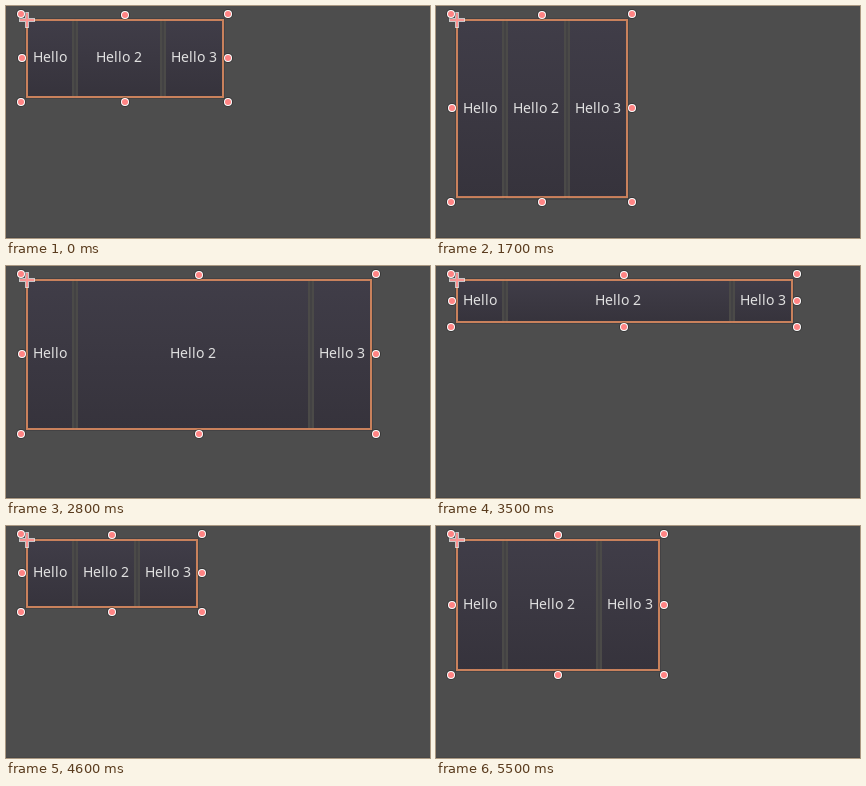
Recreate the animation shown at these times as an HTML page with a canvas. Size 424 px wide and 232 px high, loop 6100 ms.

```html
<!DOCTYPE html>
<html lang="en">
<head>
<meta charset="utf-8">
<title>Resizing a button row</title>
<style>
  html, body { margin: 0; height: 100%; overflow: hidden; background: #4d4d4d; }
  canvas { display: block; }
</style>
</head>
<body>
<canvas width="424" height="232"></canvas>
<script>
const ctx = document.querySelector('canvas').getContext('2d');
const LOOP = 6100, STEP = 100, LEFT = 21, TOP = 14, GAP = 4, PAD = 6, MIN_HEIGHT = 20;
ctx.font = '14px "Noto Sans", "Open Sans", sans-serif';

// The pointer circles once around the stage: time in ms, x, y
const path = [
  [900, 217, 91], [1600, 187, 179], [1700, 186, 191.6], [2300, 337, 201],
  [2800, 365, 163], [3000, 372, 120], [3500, 356, 56], [4100, 253, 32],
  [4400, 188, 52], [5000, 180, 138], [5500, 223, 144],
];

// Monotone cubic through the path on one axis
function pointer(axis, time) {
  const last = path.length - 1;
  const t = Math.max(path[0][0], time);
  if (t >= path[last][0]) return path[last][axis];
  const slope = i => (path[i + 1][axis] - path[i][axis]) / (path[i + 1][0] - path[i][0]);
  const tangent = i => {
    const a = slope(Math.max(i - 1, 0)), b = slope(Math.min(i, last - 1));
    return a * b > 0 ? 2 * a * b / (a + b) : 0;
  };
  const i = path.findIndex(point => point[0] > t) - 1;
  const h = path[i + 1][0] - path[i][0], u = (t - path[i][0]) / h, w = 1 - u;
  return path[i][axis] * (1 + 2 * u) * w * w + path[i + 1][axis] * u * u * (3 - 2 * u)
    + h * u * w * (tangent(i) * w - tangent(i + 1) * u);
}

// Glyphs advance by whole pixels
const advance = char => Math.round(ctx.measureText(char).width);
const textWidth = text => [...text].reduce((sum, char) => sum + advance(char), 0);
const minWidth = text => textWidth(text) + 2 * PAD;

function drawText(text, x, y) {
  ctx.fillStyle = '#e0e0e0';
  for (const char of text) {
    ctx.fillText(char, x, y);
    x += advance(char);
  }
}

function button(label, x, width, bottom) {
  const box = (color, grow) => {
    ctx.fillStyle = color;
    ctx.fillRect(x - grow, TOP - grow, width + 2 * grow, bottom - TOP + 2 * grow);
  };
  const shade = ctx.createLinearGradient(0, TOP, 0, bottom);
  shade.addColorStop(0, '#403d48');
  shade.addColorStop(1, '#36333c');
  box('#434244', 2);
  box('#4b4a48', 1);
  box(shade, -1);
  drawText(label, x + Math.floor((width - textWidth(label)) / 2), Math.floor((TOP + bottom) / 2) + 4);
}

function buttonRow(right, bottom) {
  const labels = ['Hello', 'Hello 2', 'Hello 3'];
  const [first, , third] = labels.map(minWidth);
  const middle = LEFT + first + GAP, end = right - third;
  button(labels[0], LEFT, first, bottom);
  button(labels[1], middle, end - GAP - middle, bottom);
  button(labels[2], end, third, bottom);
}

function handle(x, y) {
  ['rgba(0, 0, 0, 0.29)', '#fff', '#ff8484'].forEach((color, i) => {
    ctx.fillStyle = color;
    ctx.beginPath();
    ctx.arc(x, y, 5 - i, 0, 2 * Math.PI);
    ctx.fill();
  });
}

function cross(color, half, thickness) {
  ctx.fillStyle = color;
  ctx.beginPath();
  ctx.rect(LEFT - half, TOP - thickness / 2, 2 * half, thickness);
  ctx.rect(LEFT - thickness / 2, TOP - half, thickness, 2 * half);
  ctx.fill();
}

function selection(right, bottom) {
  ctx.strokeStyle = 'rgba(255, 153, 102, 0.7)';
  ctx.lineWidth = 2;
  ctx.strokeRect(LEFT, TOP, right - LEFT, bottom - TOP);

  cross('rgba(255, 255, 255, 0.69)', 8, 4);
  cross('rgba(255, 132, 132, 0.8)', 7, 2);

  const midX = Math.floor((LEFT + right) / 2), midY = Math.floor((TOP + bottom) / 2);
  for (const x of [LEFT - 6, right + 5])
    for (const y of [TOP - 6, bottom + 5]) handle(x, y);
  handle(midX, TOP - 5);
  handle(midX, bottom + 5);
  handle(LEFT - 5, midY);
  handle(right + 5, midY);
}

const labelsWidth = minWidth('Hello') + minWidth('Hello 2') + minWidth('Hello 3') + 2 * GAP;

function draw(time) {
  const t = Math.floor(time % LOOP / STEP) * STEP;
  const right = Math.max(pointer(1, t), LEFT + labelsWidth);
  const bottom = Math.max(pointer(2, t), TOP + MIN_HEIGHT);

  ctx.fillStyle = '#4d4d4d';
  ctx.fillRect(0, 0, 424, 232);
  ctx.fillStyle = '#474747';
  ctx.fillRect(0, 231, 424, 1);
  buttonRow(Math.round(right), Math.round(bottom));
  selection(Math.floor(right), Math.floor(bottom));
}

const start = performance.now();
function tick() {
  draw(performance.now() - start);
  requestAnimationFrame(tick);
}
tick();
</script>
</body>
</html>
```
